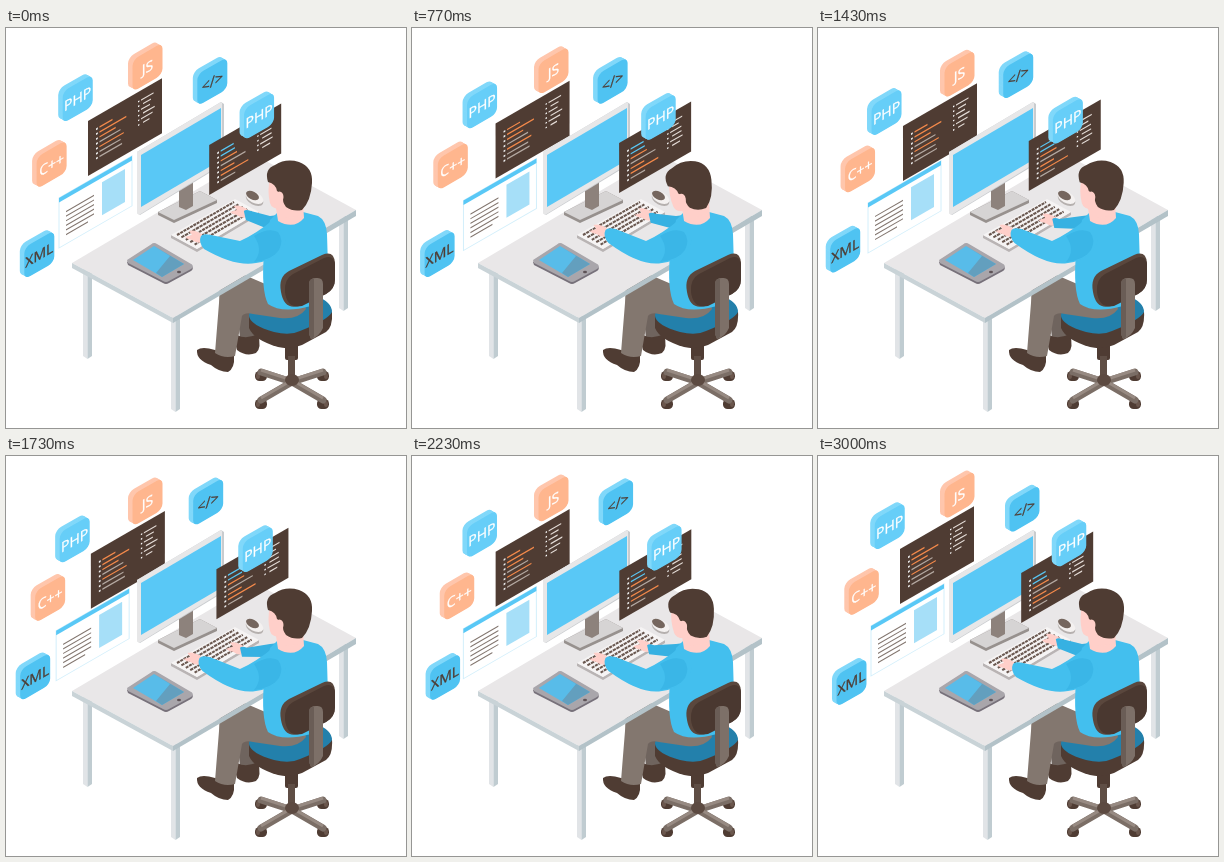
Animation of 400 by 400 pixels, one loop 3.03 s. Source, as an HTML page:

```html
<!DOCTYPE html>
<html>
<head>
<meta charset="utf-8">
<style>
html, body { margin: 0; width: 100%; height: 100%; overflow: hidden; background: #fff }
svg { display: block; width: 100vw; height: 100vh }
text { font: 14px "Open Sans", Lato, sans-serif; text-anchor: middle }
</style>
</head>
<body>
<svg id="stage" viewBox="0 0 400 400"></svg>
<script>
const LOOP = 3030, BLUE = '#59c8f6', SHIRT = '#43bfee', DARK = '#4f3c33', SKIN = '#ffcfc9';

const poly = (points, fill) => `<polygon points="${points}" fill="${fill}"/>`;
const path = (d, fill) => `<path d="${d}" fill="${fill}"/>`;
const line = (d, color, width, extra = '') =>
  `<path d="${d}" fill="none" stroke="${color}" stroke-width="${width}" ${extra}/>`;
const rect = (x, y, w, h, fill, r = 0) =>
  `<rect x="${x}" y="${y}" width="${w}" height="${h}" rx="${r}" fill="${fill}"/>`;
const oval = (x, y, rx, ry, fill, turn = 0) =>
  `<ellipse cx="${x}" cy="${y}" rx="${rx}" ry="${ry}" fill="${fill}" transform="rotate(${turn} ${x} ${y})"/>`;
const group = (id, body = '') => `<g id="${id}">${body}</g>`;
// Upright plane receding to the upper right
const wall = (x, y, body) => `<g transform="matrix(1 -.577 0 1 ${x} ${y})">${body}</g>`;

function random(seed) {
  return () => (seed = seed * 16807 % 2147483647) / 2147483647;
}

function tile(label, warm, ink) {
  const face = warm ? '#ffb68e' : ink === DARK ? '#4fc3f2' : '#66cef8';
  const side = warm ? '#ffc6ac' : '#80d8fa';
  let slab = '';
  for (let i = 0; i < 5; i++) slab += wall(i, 16 + i * .55, rect(0, 0, 30, 32, side, 6));
  return slab + wall(4.5, 18.5, rect(0, 0, 30, 32, face, 6) +
    `<text x="15" y="21" fill="${ink}" stroke="${ink}" stroke-width=".3">${label}</text>`);
}

function codePanel(w, h, accent, seed) {
  const next = random(seed);
  let body = rect(0, 0, w, h, DARK);
  for (let i = 0; i < 7; i++) {
    const y = 12 + i * 4.9, color = i < 2 ? accent : next() < .5 ? '#f58a4b' : '#b5aaa3';
    body += rect(8, y, 1.8, 1.8, '#eee') + rect(11.5, y, 13 + next() * 15, 1.4, color);
  }
  for (let i = 0; i < 6; i++) {
    const y = 9 + i * 4.7;
    body += rect(w - 24, y, 1.4, 1.4, '#fff') + rect(w - 21 + i % 2 * 2, y, 6 + next() * 8, 1.3, '#e5ddd8');
  }
  return body;
}

function webPanel() {
  let body = '<rect width="73" height="50" fill="#fff" stroke="#d3effb"/>' +
    rect(0, 0, 73, 4.5, BLUE) + rect(43, 9, 23, 33, '#a6dff8');
  for (let i = 0; i < 6; i++) body += rect(7, 17 + i * 4.6, i < 5 ? 28 : 22, 1.2, '#81746d');
  return body;
}

// dx, dy: reach of the drift; turn: 1 clockwise, -1 counterclockwise, 0 straight back and forth
const floating = (id, x, y, dx, dy, turn, body) => ({ id, x, y, dx, dy, turn, body });
const panelA = floating('panelA', 83.5, 95.5, 1.5, 2.5, 0, codePanel(74, 55, '#f58a4b', 7));
const panelB = floating('panelB', 207, 115, 3.8, -2, 0, codePanel(72, 50, BLUE, 31));
const web = floating('web', 51.5, 172.5, -1.5, 2.5, 0, webPanel());
const tiles = [
  floating('xml', 11, 198.5, 4, 3.5, 1, tile('XML', false, DARK)),
  floating('cpp', 24.6, 113.6, 3.6, 3.2, -1, tile('C++', true, '#fff')),
  floating('php', 50.6, 52, -1.6, 7, 0, tile('PHP', false, '#fff')),
  floating('js', 122, 17, 0, 3.6, 0, tile('JS', true, '#fff')),
  floating('tag', 184, 24.6, 4, 4.5, 1, tile('&lt;/&gt;', false, DARK)),
  floating('php2', 232.2, 65, 3.3, 3, -1, tile('PHP', false, '#fff'))
];
const floaters = [panelA, panelB, web, ...tiles];
const drawFloating = f => group(f.id, wallOrTile(f));
const wallOrTile = f => tiles.includes(f) ? f.body : wall(0, 0, f.body);

function leg(x, top, bottom) {
  return poly(`${x},${top} ${x + 4.5},${top} ${x + 4.5},${bottom} ${x},${bottom - 3}`, '#e1e4e7') +
    poly(`${x + 4.5},${top} ${x + 9},${top} ${x + 9},${bottom - 3} ${x + 4.5},${bottom}`, '#c0ccd1');
}

const desk = leg(77, 238, 331) + leg(333, 188, 283) + leg(165, 288, 384) +
  poly('66,235 249,127 350,182 167,290', '#e9e7e8') +
  poly('66,235 167,290 167,295 66,240', '#c9d3d7') +
  poly('167,290 350,182 350,188 167,295', '#b3c2c8');

const monitor =
  poly('152,184 194,163 211,172 211,175 168,195 152,187', '#97918e') +
  poly('152,184 194,163 211,172 168,192', '#d6d4d4') +
  poly('173,158 187,151 187,178 180,182 173,179', '#8d827c') +
  poly('131,124 215,74 218,76 218,136 134,187 131,185', '#c9cccf') +
  poly('131,124 215,74 216,75 216,136 133,187 131,185', '#e7e7e8') +
  poly('135,127 215,80 215,132 135,179', BLUE);

function keyboard() {
  let keys = '';
  for (let i = 0; i < 5; i++)
    keys += line(`M${171 + i * 4.4} ${207 + i * 2.4}l57 -33`, '#6b5951', 2.1, `stroke-dasharray="${3 + i % 2 * .4} .8"`);
  return poly('165,207 165,210 191,224 253,187 253,184 191,221', '#b9b4b4') +
    poly('165,207 229,171 253,184 191,221', '#f6f4f4') + keys;
}

const mouse = oval(248.5, 171.5, 9.5, 5.5, '#b5b0ae', 28) + oval(248.5, 169.5, 9.5, 5.5, '#f4f1f0', 28) +
  oval(246.5, 167.5, 7, 4, '#75665e', 28);

const tablet =
  path('M121 234L145 218Q148 215 151 217L186 238Q188 241 185 243L163 255Q160 257 157 255L122 237Z', '#77717a') +
  path('M121 232L145 216.5Q148 214 151 216L186 236.5Q188 239 185 241L163 253Q160 255 157 253L122 235Z', '#a9a6ab') +
  poly('127,232 148,218 178,236 156,249', '#58bce9') +
  poly('148,218 178,236 156,249 150,245 164,228', '#639fbe') +
  oval(173, 244, 2, 1.3, '#5d5357');

function chairBase() {
  let legs = '', wheels = '';
  for (const sx of [-1, 1]) for (const sy of [-1, 1]) {
    const x = 286 + 31 * sx, y = 358 + 14 * sy;
    legs += line(`M286 354L${x} ${y}`, '#7b6e66', 7, 'stroke-linecap="round"') +
      line(`M286 352L${x} ${y - 2}`, '#978a82', 3);
    wheels += rect(x - 6, y - 1, 12, 10, DARK, 4.5) + oval(x + 3 * sx, y + 4, 2, 3, '#6b574d');
  }
  return wheels + legs + rect(279, 312, 13, 20, DARK, 2) + rect(282, 328, 7, 27, '#5f4e45') +
    oval(286, 352, 7, 6, '#5c4a41');
}

const farLeg = path('M230 270L252 285V309L234 311Z', '#6f645e') +
  path('M231 307Q240 312 252 306Q256 320 250 325Q240 329 231 322Q228 314 231 307Z', DARK);

const seat =
  path('M243 288V300Q248 312 272 319Q284 322 296 317L320 304Q327 299 326 284Z', DARK) +
  path('M243 288Q243 279 262 274L310 268Q326 274 326 284Q322 292 294 303Q284 308 268 304Q244 297 243 288Z', '#2380ab');

const nearLeg =
  path('M191 322Q196 318 209 322L228 328Q229 340 222 344Q213 344 205 337Q190 332 191 322Z', DARK) +
  path('M264 258L236 246L214 252L213 275L209 325Q218 331 229 328L236 288Q239 284 247 286L274 290Q292 292 300 281L296 266Z', '#83776f');

const torso =
  path('M264 192L271 185Q286 200 297 184L312 188Q320 192 321 206L322 240L305 278Q276 286 262 276Q255 262 258 226Z', SHIRT) +
  path('M270 180L297 174L298 190Q288 202 272 193Z', SKIN);

const chairBack =
  path('M275 264Q272 249 283 243L316 227Q328 222 329 235V251Q329 261 320 266L293 278Q278 282 275 264Z', '#5a473d') +
  path('M279 264Q278 251 287 246L318 230Q328 226 329 237V251Q329 261 320 266L296 278Q281 281 279 264Z', '#4a3830') +
  path('M303 255Q304 250 310 250Q317 249 317 256V300Q313 309 305 311L303 306Z', '#7d7068') +
  path('M303 255Q304 250 308 251V309L305 311L303 306Z', '#6a5d56');

const head =
  path('M264 150Q261 163 264 175Q266 182 277 181L279 190L296 188L296 160Z', SKIN) +
  path('M262 154Q258 141 269 137Q280 130 293 134Q307 139 306 155Q305 173 296 182Q287 184 280 179Q276 174 277 167L271 163Q270 156 262 154Z', DARK) +
  oval(273.5, 169, 4, 5.5, SKIN);

stage.innerHTML = drawFloating(panelA) + chairBase() + farLeg + seat + nearLeg + desk +
  drawFloating(web) + monitor + keyboard() + mouse + tablet + drawFloating(panelB) +
  tiles.map(drawFloating).join('') + group('farArm') + torso +
  group('nearArm') + chairBack + group('head', head);

const el = id => document.getElementById(id);
const wave = (t, peak) => Math.cos(2 * Math.PI * (t - peak) / LOOP);

// Smooth step from 0 at time a to 1 at time b
function ramp(t, a, b) {
  const p = Math.min(1, Math.max(0, (t - a) / (b - a)));
  return p * p * (3 - 2 * p);
}

function place({ id, x, y, dx, dy, turn }, t) {
  const peak = turn ? 2565 + 85 * turn : LOOP / 2;
  const lag = turn * LOOP / 4;
  el(id).setAttribute('transform',
    `translate(${x + dx * wave(t, peak)} ${y + dy * wave(t, peak + lag)})`);
}

function hand(x, y) {
  return path(`M${x + 8} ${y - 3}Q${x} ${y - 8} ${x - 5} ${y - 6}L${x - 2} ${y - 2}L${x - 9} ${y}
    Q${x - 6} ${y + 3} ${x - 2} ${y + 3}Q${x + 3} ${y + 7} ${x + 9} ${y + 5}Z`, SKIN);
}

function drawArms(t) {
  const reach = wave(t, 1700), fx = 231 - 2 * reach, fy = 188.3 + 4.5 * reach;
  const lift = ramp(t, 400, 650) - ramp(t, 2280, 2520), x = 195 - 1.5 * lift, y = 208 - 6 * lift;
  el('farArm').innerHTML = hand(fx, fy) +
    path(`M${fx + 5} ${fy - 1}Q${fx + 7} ${fy - 3} ${fx + 12} ${fy - 1}L264 188L280 186L278 208L262 201L${fx + 7} ${fy + 8}Z`, '#36b1e2');
  el('nearArm').innerHTML = hand(x - 7, y + 1) +
    path(`M${x} ${y}Q${x + 2} ${y - 3} ${x + 10} ${y - 1}L234 213Q250 206 268 191L280 212
      Q274 232 250 235Q229 239 ${x + 3} ${y + 13}Q${x - 3} ${y + 6} ${x} ${y}Z`, SHIRT) +
    path('M248 208Q262 199 272 204Q278 212 273 222Q266 232 248 234Q258 222 248 208Z', '#3ab6e7');
}

function frame(now) {
  const t = now % LOOP, beat = t * 2 / LOOP % 1;
  const nod = ramp(beat, .4, .53) - ramp(beat, .77, .97);
  floaters.forEach(f => place(f, t));
  el('head').setAttribute('transform', `rotate(${-10.5 * nod} 284 192)`);
  drawArms(t);
}

const start = performance.now();
(function tick() {
  frame(performance.now() - start);
  requestAnimationFrame(tick);
})();
</script>
</body>
</html>
```
